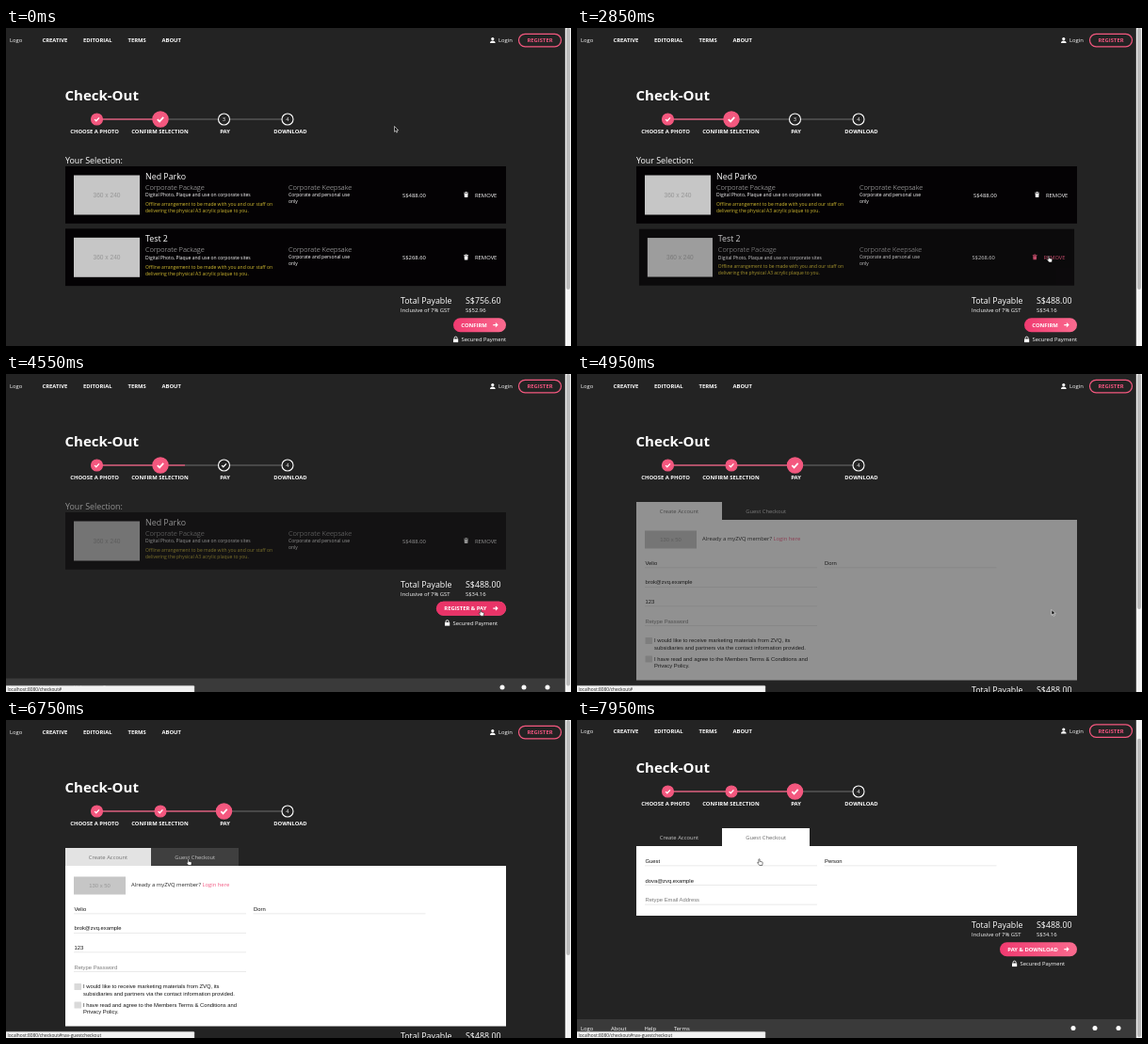
Animation, 600 px wide and 338 px high, one loop 8 s. Source, as an HTML page:

```html
<!DOCTYPE html>
<html lang="en">
<head>
<meta charset="utf-8">
<title>Check-Out</title>
<style>
  html, body { margin: 0; height: 100%; overflow: hidden; background: #232323; }
  svg { display: block; width: 100vw; height: 100vh; }
  text { font: 5.85px "Open Sans", sans-serif; fill: #fff; white-space: pre; }
  .bold { font-weight: 700; }
  .title { font-size: 15px; font-weight: 700; }
  .big { font-size: 8.85px; }
  .pack { font-size: 7.4px; font-weight: 300; fill: #d0d0d0; }
  .small { font-size: 5px; }
  .note { font-size: 5px; fill: #d2bb30; }
  .field { font-family: "Liberation Sans", Arial, sans-serif; fill: #111; }
  .hint { fill: #777; }
  .dim { font-family: "Liberation Sans", Arial, sans-serif; fill: #969696; }
  .status { font-size: 4.82px; fill: #222; }
  .mid { text-anchor: middle; }
  .pink { fill: #f2547f; }
</style>
</head>
<body>
<script>
const LOOP = 8000, PINK = '#f4587f', BG = '#232323';
const STEP_X = [96.5, 164, 231.5, 299];

const text = (x, y, str, cls = '', attrs = '') => `<text x="${x}" y="${y}" class="${cls}" ${attrs}>${str}</text>`;
const rect = (x, y, w, h, fill, attrs = '') => `<rect x="${x}" y="${y}" width="${w}" height="${h}" fill="${fill}" ${attrs}/>`;
const group = (id, body) => `<g id="${id}">${body}</g>`;

const row = (id, y, name, price) => group(id,
  rect(63, y, 468, 60.8, '#040204') +
  rect(72, y + 9.5, 70, 42, '#c6c6c6') +
  text(107, y + 33, '360 x 240', 'dim mid', 'style="font-size:6.6px"') +
  text(148, y + 13.5, name, 'big') +
  text(148, y + 25, 'Corporate Package', 'pack') +
  text(148, y + 32.3, 'Digital Photo, Plaque and use on corporate sites', 'small') +
  text(148, y + 42.3, 'Offline arrangement to be made with you and our staff on', 'note') +
  text(148, y + 49.3, 'delivering the physical A3 acrylic plaque to you.', 'note') +
  text(300, y + 24.5, 'Corporate Keepsake', 'pack') +
  text(300, y + 32, 'Corporate and personal use', 'small') +
  text(300, y + 39, 'only', 'small') +
  text(421, y + 32.6, price) +
  `<g id="${id}Remove"><path transform="translate(486 ${y + 27})" d="M.2.7h1.5l.3-.6h1.2l.3.6H5v.8H.2zM.6 1.9h4l-.3 4.2H.9z"/>` +
  text(498, y + 32.6, 'REMOVE', '', 'style="fill:inherit"') + '</g>');

const field = (x, y, value, hint = '') =>
  text(x + .5, y, value, 'field ' + hint) + rect(x, y + 2.6, 183, .6, '#dcdcdc');

const checkbox = (y, first, second) =>
  rect(72.5, y, 7.5, 7, '#d9d9d9', 'rx=".6"') +
  text(82, y + 5, first, 'field') + text(82, y + 12.8, second, 'field');

const step = (x, i) => `<g id="step${i}" transform="translate(${x} 97)">
  <circle r="6" stroke-width="1.1"/>
  <path d="M-2.4.1l1.7 1.7L2.4-1.6" fill="none" stroke="#fff" stroke-width="1.3"/>
  ${text(0, 2.1, i + 1, 'mid')}</g>`;

const nav = group('nav',
  text(4, 15.4, 'Logo') +
  [[38.5, 'CREATIVE'], [82, 'EDITORIAL'], [129.5, 'TERMS'], [165.5, 'ABOUT']]
    .map(([x, s]) => text(x, 15.2, s, 'bold')).join('') +
  '<circle cx="516.8" cy="11.6" r="1.6" fill="#fff"/><path d="M514 16q0-2.6 2.8-2.6t2.8 2.6z" fill="#fff"/>' +
  text(523, 15.4, 'Login') +
  rect(544.5, 6.3, 45, 13.6, 'none', `rx="6.8" stroke="${PINK}" stroke-width="1.2"`) +
  text(567, 15.3, 'REGISTER', 'bold mid pink'));

const steps =
  rect(96, 96.6, 203, .8, '#808080') + rect(96, 96.4, 68, 1.2, PINK) +
  rect(164, 96.4, 0, 1.2, PINK, 'id="progress"') +
  STEP_X.map(step).join('') +
  [[94, 'CHOOSE A PHOTO'], [163.5, 'CONFIRM SELECTION'], [232.5, 'PAY'], [302, 'DOWNLOAD']]
    .map(([x, s]) => text(x, 111.6, s, 'bold mid')).join('');

const list = group('list', text(63, 143.6, 'Your Selection:', 'big') +
  row('row1', 147, 'Ned Parko', 'S$488.00') + row('row2', 213.3, 'Test 2', 'S$268.60'));

const form = group('form',
  rect(63, 136, 91, 19.5, '#fff', 'id="tab1"') + rect(154, 136, 93, 19.5, '#fff', 'id="tab2"') +
  text(108.5, 147.7, 'Create Account', 'mid', 'id="tabText1"') +
  text(200.7, 147.7, 'Guest Checkout', 'mid', 'id="tabText2"') +
  rect(63, 155, 468, 170.5, '#fff', 'id="panel"') +
  group('create',
    rect(72, 166.5, 55, 19, '#c6c6c6') + text(99.5, 178.3, '130 x 50', 'dim mid') +
    text(133, 176.6, 'Already a myZVQ member? <tspan fill="#f2547f">Login here</tspan>', '', 'style="fill:#222"') +
    field(72, 203, 'Velio') + field(262.5, 203, 'Dorn') +
    field(72, 223.4, 'brok@zvq.example') + field(72, 244, '123') +
    field(72, 264.8, 'Retype Password', 'hint') +
    checkbox(280, 'I would like to receive marketing materials from ZVQ, its',
      'subsidiaries and partners via the contact information provided.') +
    checkbox(299.5, 'I have read and agree to the Members Terms &amp; Conditions and', 'Privacy Policy.')) +
  group('guest',
    field(72, 173, 'Guest') + field(262.5, 173, 'Person') +
    field(72, 193.5, 'dova@zvq.example') + field(72, 214.2, 'Retype Email Address', 'hint')));

const summary = group('summary',
  text(419, 293, 'Total Payable', 'big') + text(488, 293, '', 'big', 'id="total"') +
  text(419, 302.4, 'Inclusive of 7% GST') + text(488, 302.4, '', '', 'id="tax"') +
  rect(0, 308.3, 0, 15, 'url(#shine)', 'rx="7.5" id="button"') +
  rect(0, 308.3, 0, 15, '#e93468', 'rx="7.5" id="hover"') +
  text(0, 317.6, '', 'bold', 'id="label"') +
  '<path d="M517.3 315.6h4.6m-2-2 2 2-2 2" fill="none" stroke="#fff" stroke-width="1.1"/>' +
  group('secured',
    '<path d="M-28 330.5h5.2v3.6H-28z" fill="#fff"/><path d="M-26.9 330.6v-1a1.5 1.5 0 0 1 3 0v1" fill="none" stroke="#fff" stroke-width=".9"/>' +
    text(-19.5, 333.4, 'Secured Payment')) +
  rect(0, 390, 594, 21, '#3a3a3a') +
  [[4, 'Logo'], [36, 'About'], [71.5, 'Help'], [103, 'Terms']].map(([x, s]) => text(x, 401.6, s)).join('') +
  [527, 550, 575].map(x => `<circle cx="${x}" cy="399.4" r="2.5" fill="#fff"/>`).join(''));

document.body.innerHTML = `<svg viewBox="0 0 600 338">
  <defs><linearGradient id="shine"><stop stop-color="#f03a70"/><stop offset="1" stop-color="#fa6b8f"/></linearGradient></defs>
  <rect width="600" height="338" fill="${BG}"/>
  ${group('page', text(62.5, 77.3, 'Check-Out', 'title') + steps + list + form + summary)}
  ${nav}
  ${rect(593.8, 0, 6.2, 338, '#f4f4f4')}${rect(595, 0, 4, 0, '#bcbcbc', 'rx="2" id="thumb"')}
  ${group('statusBar', rect(-1, 331.3, 201, 8, '#f2f2f2', 'rx="1" stroke="#aaa" stroke-width=".5"') + text(1.5, 336.6, '', 'status', 'id="url"'))}
  <path id="arrow" d="M0 0v5.8l1.3-1.2.9 2 1-.4-.9-2h1.8z" fill="#000" stroke="#fff" stroke-width=".6"/>
  <path id="hand" transform="" d="M-.6.3q.6-.8 1.2 0v2.2l2.3.5q.9.2.8 1.1l-.5 2.6H.3L-1.9 4q.1-.9.9-.5l.4.4z" fill="#fff" stroke="#000" stroke-width=".5"/>
</svg>`;

const $ = id => document.getElementById(id);
const set = (id, attrs) => Object.entries(attrs).forEach(([k, v]) => $(id).setAttribute(k, v));
const show = (id, on) => set(id, { visibility: on ? 'visible' : 'hidden' });
const write = (id, str) => { if ($(id).textContent !== str) $(id).textContent = str; };
const ramp = (t, a, b) => Math.max(0, Math.min(1, (t - a) / (b - a)));
const smooth = (t, a, b) => { const p = ramp(t, a, b); return p * p * (3 - 2 * p); };
const mix = (a, b, p) => a + (b - a) * p;
const within = (t, ...spans) => spans.some(([a, b]) => t >= a && t < b);

const PATH = [[50, 412.5, 104.5], [350, 503, 312], [500, 503, 312], [850, 500, 303], [1000, 500, 303],
  [1400, 480, 235], [1800, 500, 175], [1850, 500, 175], [2550, 501, 242.3], [3650, 501, 242.3],
  [4000, 504, 250.5], [5000, 504, 250.5], [5500, 287, 104], [5650, 287, 104], [5850, 199.7, 167],
  [6300, 193.5, 147.8], [LOOP, 193.5, 147.8]];

function pointer(t) {
  const i = PATH.findIndex(k => k[0] >= t);
  if (i < 1) return PATH[0].slice(1);
  const [a, x0, y0] = PATH[i - 1], [b, x1, y1] = PATH[i], p = smooth(t, a, b);
  return [mix(x0, x1, p), mix(y0, y1, p)];
}

function render(t) {
  const paying = t >= 4750, guest = t >= 6900;

  // Steps
  const hover = smooth(t, 230, 350) - smooth(t, 550, 800) + smooth(t, 4150, 4450);
  const advance = smooth(t, 4750, 4900);
  set('progress', { width: mix(26 * hover, 67.5, advance) });
  STEP_X.forEach((x, i) => {
    const [circle, check, number] = $('step' + i).children;
    const size = i === 1 ? 8 - 2 * advance : i === 2 ? 6 + 2 * advance : 6;
    const done = i < 2 || i === 2 && paying;
    const checked = done || i === 2 && hover > .4;
    circle.setAttribute('fill', done ? PINK : BG);
    circle.setAttribute('stroke', done ? PINK : '#fff');
    set('step' + i, { transform: `translate(${x} 97) scale(${size / 6})` });
    check.setAttribute('visibility', checked ? 'visible' : 'hidden');
    number.setAttribute('visibility', checked ? 'hidden' : 'visible');
  });

  // Selection list
  const leave = ramp(t, 2750, 3150), scale = 1 - .05 * leave;
  show('list', !paying);
  set('list', { opacity: 1 - ramp(t, 4350, 4750) });
  set('row2', { opacity: 1 - leave, transform: `translate(297 243.7) scale(${scale}) translate(-297 -243.7)` });
  set('row1Remove', { fill: within(t, [1650, 1980]) ? PINK : '#fff' });
  set('row2Remove', { fill: t >= 2400 ? PINK : '#fff' });

  // Account form
  const swap = ramp(t, 6700, 7100);
  show('form', paying);
  set('form', { opacity: ramp(t, 4750, 5150) });
  set('tab1', { opacity: 1 - swap });
  set('tab2', { opacity: swap });
  $('tabText1').style.fill = `hsl(0 0% ${mix(40, 78, swap)}%)`;
  $('tabText2').style.fill = `hsl(0 0% ${mix(82, 40, swap)}%)`;
  set('panel', { height: guest ? 74 : 170.5 });
  set('create', { opacity: 1 - ramp(t, 6750, 6900) });
  set('guest', { opacity: ramp(t, 6900, 7150) });

  // Summary and footer
  const shift = guest ? -51 : paying ? 46 : -66.5 * smooth(t, 3150, 3550);
  const [label, width] = guest ? ['PAY & DOWNLOAD', 82] : t >= 4350 ? ['REGISTER & PAY', 74] : ['CONFIRM', 56];
  const left = 531 - width;
  set('summary', { transform: `translate(0 ${shift})` });
  write('total', t < 2750 ? 'S$756.60' : 'S$488.00');
  write('tax', t < 2750 ? 'S$52.96' : 'S$34.16');
  write('label', label);
  set('label', { x: left + 8.3 });
  set('button', { x: left, width });
  set('hover', { x: left, width, opacity: smooth(t, 230, 350) - smooth(t, 550, 750) + smooth(t, 3700, 3950) - smooth(t, 4750, 5000) });
  set('secured', { transform: `translate(${left + width / 2} 0)` });

  // Scrolling
  const pageHeight = 411 + shift, scroll = 21 * smooth(t, 7580, 7930);
  set('page', { transform: `translate(0 ${-scroll})` });
  set('nav', { transform: `translate(0 ${-scroll / 14})` });
  set('thumb', { y: scroll * 338 / pageHeight, height: 338 * 338 / pageHeight });

  // Browser status and pointer
  const [x, y] = pointer(t);
  const hand = within(t, [250, 650], [1650, 2000], [2380, 4750], [6050, LOOP]);
  show('statusBar', within(t, [4200, 5100], [6150, LOOP]));
  write('url', 'localhost:8080/checkout#' + (t > 6000 ? 'nav-guestcheckout' : ''));
  show('hand', hand);
  show('arrow', !hand);
  set(hand ? 'hand' : 'arrow', { transform: `translate(${x} ${y})` });
}

const start = performance.now();
function tick() {
  render((performance.now() - start) % LOOP);
  requestAnimationFrame(tick);
}
tick();
</script>
</body>
</html>
```
